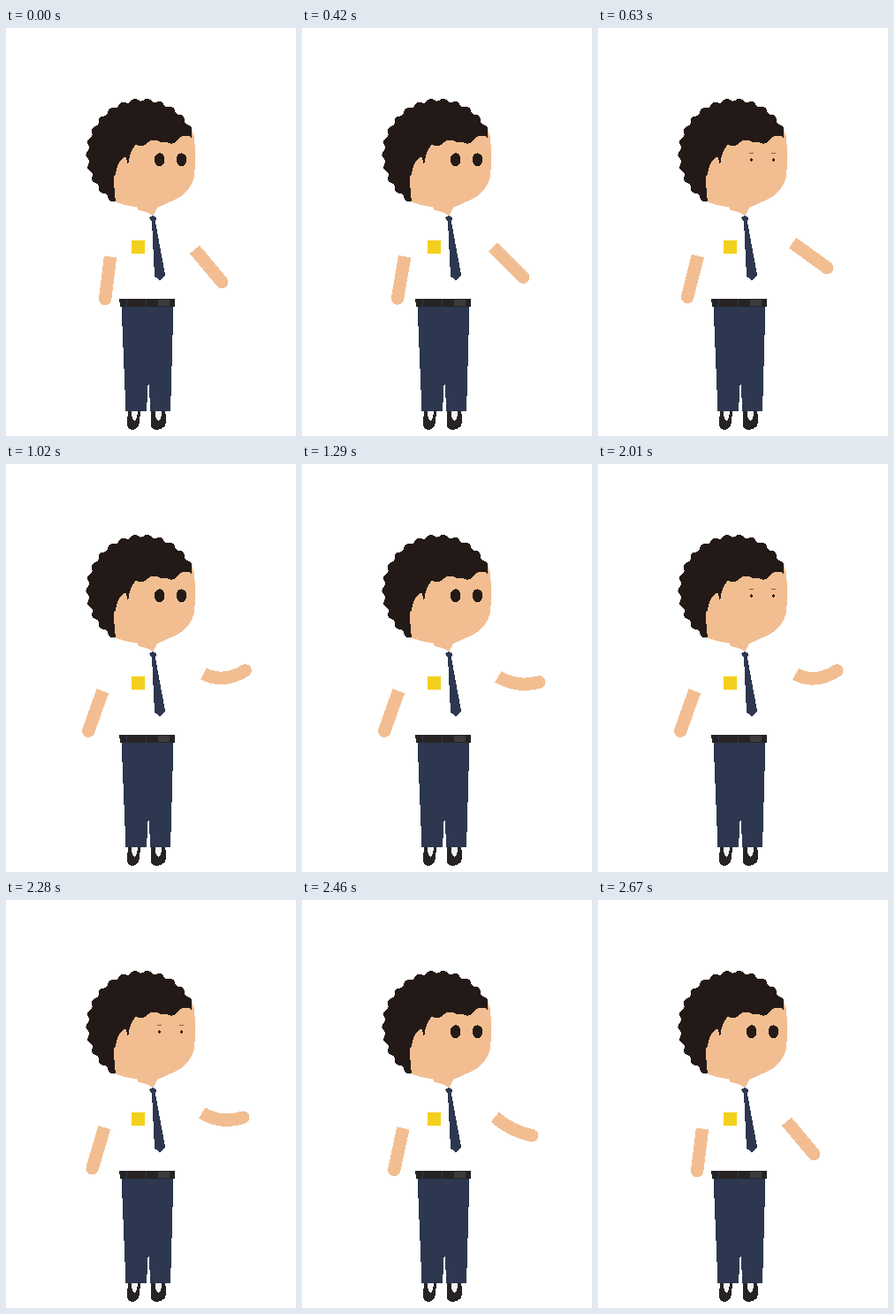
Recreate the animation shown at these times as an HTML page. Size 328 by 461 pixels, loop 2.7 s.

```html
<!DOCTYPE html>
<html lang="en">
<head>
<meta charset="utf-8">
<title>Talking student</title>
<style>
  html, body { margin: 0; width: 100%; height: 100%; overflow: hidden; background: #fff; }
  svg { display: block; width: 328px; height: 461px; shape-rendering: crispEdges; }
  .skin { fill: #f2be91; }
  .hair { fill: #231a17; }
  .navy { fill: #2d374f; }
  .dark { fill: #272324; }
  .pale { fill: #f1f1f4; }
  .limb { fill: none; stroke: #f2be91; stroke-width: 14.4; }
</style>
</head>
<body>
<svg viewBox="0 0 328 461">
  <!-- head -->
  <path class="skin" d="M118 150L150 115H210Q213.500 122 213.500 132V160C213.500 177 204 188 191 194L171 203Q169 208 166.500 212Q160 207 150 206L148 202Q134 201 123 196L118 170Z"/>
  <path id="curls" class="hair"/>
  <g id="open" class="hair">
    <ellipse cx="173.700" cy="148.700" rx="5.800" ry="7.400"/>
    <ellipse cx="198.500" cy="148.700" rx="5.800" ry="7.400"/>
  </g>
  <g id="shut" class="hair">
    <circle cx="173.300" cy="149" r="1.700"/>
    <circle cx="198.300" cy="149" r="1.700"/>
    <path d="M171 141.500H176M196 141.500H201" stroke="#8c5c47"/>
  </g>

  <!-- uniform -->
  <path class="navy" d="M162 214.500L166 211.500L170 214.500L169 219L180 279L174.500 285.500L168 280.500L165 219Z"/>
  <rect x="142" y="240" width="15" height="15" fill="#f3cf1d"/>
  <path class="navy" d="M130.500 313H189.500L186 433H163.500L161 395L159 433H135.500Z"/>
  <path class="dark" d="M128 305.500H191.500L190.500 315H129Z"/>
  <path d="M172 306.500H185V314H172Z" fill="#3d3b3c"/>
  <path d="M136.500 306V315M158.500 306V315" stroke="#2d374f" stroke-width="1.800"/>

  <!-- shoes -->
  <path class="dark" d="M138 433H151.500Q152 443 149.500 450Q147 454 142 454Q137 453 137 446Z"/>
  <path class="pale" d="M142 433H149Q148 444 145 444Q142 442 142 433Z"/>
  <path class="dark" d="M164 433H180Q182 442 180 449Q176 454 169 454Q163 452 163.500 446Z"/>
  <path class="pale" d="M168.500 433H176Q176 444 172 444Q169 442 168.500 433Z"/>

  <g id="left"><path class="limb"/><circle class="skin" r="7.200"/></g>
  <g id="right"><path class="limb"/><circle class="skin" r="7.200"/></g>
</svg>
<script>
  const LOOP = 2700, STEP = 30, HOLD = 300;
  const FRINGE = "L210.500 124Q203 119 196 124Q190 134 182 129Q174 130 171 127Q163 125 158 132Q151 134 147 131.500Q140 138 138 155L135.500 145.500Q126 149 124 165Q121 167 122 176L124 197Z";

  const byId = id => document.getElementById(id);
  const ramp = (t, from, to) => Math.min(1, Math.max(0, (t - from) / (to - from)));
  const mix = (a, b, p) => a + (b - a) * p;

  function polar(x, y, r, deg) {
    const a = deg * Math.PI / 180;
    return [x + r * Math.cos(a), y + r * Math.sin(a)];
  }

  // Wavy rim around the back of the head, closed by the fringe
  function drawCurls() {
    const rim = [];
    for (let deg = 119; deg <= 334; deg++) {
      const wave = Math.cos((deg - 262) / 13.7 * 2 * Math.PI);
      rim.push(polar(154, 143, 62 + 1.6 * wave, deg));
    }
    byId("curls").setAttribute("d", "M" + rim.join("L") + FRINGE);
  }

  // The sleeve is white on white, so only the forearm shows
  function drawArm(id, x, y, angle, bend) {
    const base = polar(x, y, 41, angle);
    const elbow = polar(x, y, 66, angle);
    const hand = polar(x, y, 89 - bend * 0.25, angle - bend);
    const [limb, fist] = byId(id).children;
    limb.setAttribute("d", `M${base}Q${elbow} ${hand}`);
    fist.setAttribute("cx", hand[0]);
    fist.setAttribute("cy", hand[1]);
  }

  function draw(now) {
    const raw = now % LOOP;
    const t = raw < HOLD ? 0 : Math.floor(raw / STEP) * STEP;

    const drop = ramp(t, 2160, 2670);
    const raise = ramp(t, 300, 850) - drop;
    const curl = ramp(t, 660, 1050) - drop;
    const dip = ramp(t, 1050, 1575) - ramp(t, 1575, 2040);
    const swing = ramp(t, 300, 870) - drop;

    drawArm("right", 187, 218.8, mix(50, 26.5, raise) + 11 * dip, 18 * curl - 11.5 * dip);
    drawArm("left", 123, 217.8, mix(97, 109.5, swing), 0);

    const shut = (t >= 480 && t < 780) || (t >= 1980 && t < 2340);
    byId("open").style.display = shut ? "none" : "";
    byId("shut").style.display = shut ? "" : "none";
  }

  const start = performance.now();
  function tick() {
    draw(performance.now() - start);
    requestAnimationFrame(tick);
  }
  drawCurls();
  tick();
</script>
</body>
</html>
```
